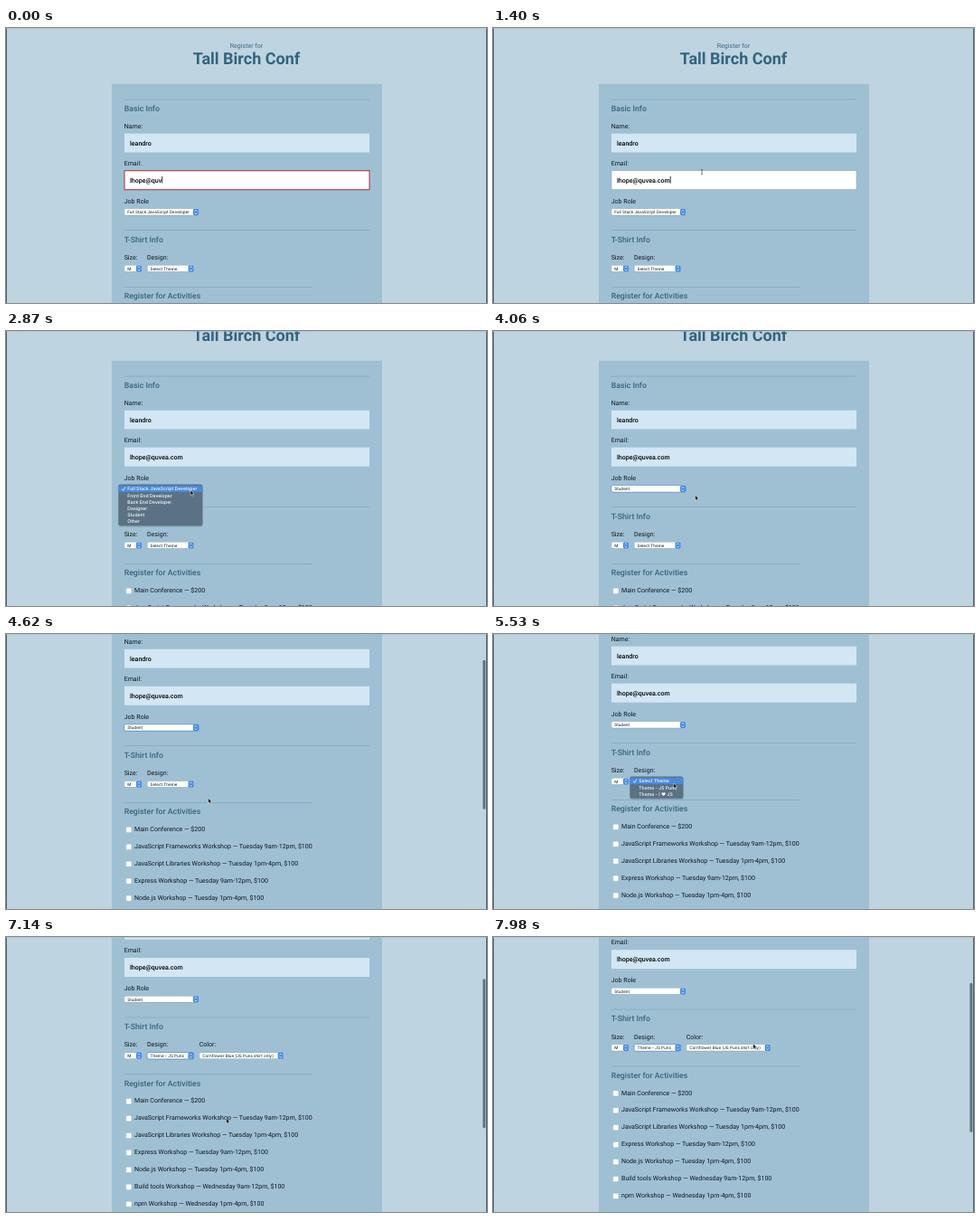
An HTML page for the animation above (8000 ms loop, 532 by 304 pixels).

```html
<!DOCTYPE html>
<html lang="en">
<head>
<meta charset="utf-8">
<title>Conference registration</title>
<style>
  html, body { margin: 0; width: 100%; height: 100%; overflow: hidden; background: #bed4e1; }
  svg { display: block; width: 532px; height: 304px; }
  text { font-family: Roboto, Inter, sans-serif; font-size: 7.05px; fill: #0c1820; white-space: pre; text-rendering: geometricPrecision; }
  .title { font-size: 18px; font-weight: 700; fill: #33647e; }
  .sub { fill: #3d6a81; }
  .legend { font-size: 8.75px; font-weight: 500; fill: #35647c; }
  .value { font-weight: 500; fill: #000; }
  .pick { font-family: Inter, sans-serif; font-size: 4.6px; fill: #111; }
  .option { font-family: Inter, "DejaVu Sans", sans-serif; font-size: 5.1px; font-weight: 500; fill: #fff; }
  .rule { fill: #82a9be; }
  .field { fill: #d2e6f3; }
</style>
</head>
<body>
<svg id="stage" viewBox="0 0 532 304"></svg>
<script>
const LOOP = 8000, STEP = 70, ROW = 7.15;
const JOB_Y = 203.5, SHIRT_Y = 266;
const EMAIL = "lhope@quvea.com";
const jobs = ["Full Stack JavaScript Developer", "Front End Developer", "Back End Developer", "Designer", "Student", "Other"];
const themes = ["Select Theme", "Theme - JS Puns", "Theme - I \u2665 JS"];
const activities = [
  "Main Conference \u2014 $200",
  "JavaScript Frameworks Workshop \u2014 Tuesday 9am-12pm, $100",
  "JavaScript Libraries Workshop \u2014 Tuesday 1pm-4pm, $100",
  "Express Workshop \u2014 Tuesday 9am-12pm, $100",
  "Node.js Workshop \u2014 Tuesday 1pm-4pm, $100",
  "Build tools Workshop \u2014 Wednesday 9am-12pm, $100",
  "npm Workshop \u2014 Wednesday 1pm-4pm, $100"
];

// time of each typed character after the first nine
const keyTimes = [140, 350, 490, 630, 770, 910];
// scrolls: start, end, from, to
const scrolls = [[1400, 2100, 0, 29], [4060, 4800, 29, 103], [6830, 7460, 103, 143.5]];
// pointer: time, x, y
const pointerPath = [
  [1400, 231, 159], [2300, 231, 159], [2800, 204, 176], [3100, 204, 176],
  [3500, 214, 203], [3640, 214, 203], [3850, 223.7, 181.5], [4900, 223.7, 181.5],
  [5320, 199.7, 165], [5600, 199.7, 165], [5800, 199, 171.5], [6050, 199, 171.5],
  [6500, 243.7, 200.5], [7480, 243.7, 200.5], [7850, 287.7, 118]
];

function add(parent, tag, attrs = {}, text) {
  const el = document.createElementNS("http://www.w3.org/2000/svg", tag);
  for (const k in attrs) el.setAttribute(k, attrs[k]);
  if (text) el.textContent = text;
  parent.appendChild(el);
  return el;
}
const rect = (p, x, y, width, height, attrs) => add(p, "rect", { x, y, width, height, ...attrs });
const label = (p, x, y, text, cls = "", dy = 2.5) => add(p, "text", { x, y: y + dy, class: cls }, text);
const show = (el, on) => el.setAttribute("visibility", on ? "visible" : "hidden");

function section(y, text, right = 402) {
  rect(page, 131, y, right - 131, 0.8, { class: "rule" });
  label(page, 130.7, y + 10.2, text, "legend", 3.1);
}

function select(p, x, y, w, value) {
  const g = add(p, "g");
  const ring = rect(g, x - 0.7, y - 4.1, w + 1.4, 8.2, { rx: 2, fill: "#5a97d8" });
  rect(g, x, y - 3.5, w, 7.2, { rx: 1.5, fill: "#7f9dae" });
  rect(g, x + 0.2, y - 3.4, w - 0.4, 6.7, { rx: 1.4, fill: "#fff" });
  const bx = x + w - 6;
  rect(g, bx, y - 3.5, 6, 7, { rx: 1.4, fill: "#4288e4" });
  add(g, "path", {
    d: `M${bx + 1.6} ${y - 0.7}l1.4-1.6 1.4 1.6M${bx + 1.6} ${y + 0.7}l1.4 1.6 1.4-1.6`,
    fill: "none", stroke: "#fff", "stroke-width": 0.7
  });
  const text = label(g, x + 3.2, y, value, "pick", 1.8);
  return { ring, text };
}

function popup(x, y, w, options) {
  const g = add(page, "g");
  const h = options.length * ROW + 2.8;
  rect(g, x + 0.5, y - 3.8, w, h, { rx: 2.5, fill: "#2b4454", opacity: 0.25 });
  rect(g, x, y - 4.9, w, h, { rx: 2, fill: "#5a7284" });
  const bar = rect(g, x, y - 3.6, w, ROW, { fill: "#4a8adb" });
  add(g, "path", { d: `M${x + 4} ${y}l1.3 1.8 2.4-3.8`, fill: "none", stroke: "#fff", "stroke-width": 0.8 });
  options.forEach((o, i) => label(g, x + 10, y + i * ROW, o, "option", 1.9));
  return {
    g,
    hover(pageY) {
      const i = Math.max(0, Math.min(options.length - 1, Math.round((pageY - y) / ROW)));
      bar.setAttribute("y", y - 3.6 + i * ROW);
    }
  };
}

const stage = document.getElementById("stage");
rect(stage, 0, 0, 532, 304, { fill: "#bed4e1" });
const page = add(stage, "g");

add(page, "text", { x: 266, y: 22, class: "sub", "text-anchor": "middle" }, "Register for");
add(page, "text", { x: 266, y: 39.7, class: "title", "text-anchor": "middle" }, "Tall Birch Conf");
rect(page, 117, 61.8, 299, 600, { fill: "#9fc0d3" });

section(78.7, "Basic Info");
label(page, 130.7, 108, "Name:");
rect(page, 131, 116.7, 271, 20.8, { class: "field" });
label(page, 137, 127, "leandro", "value");
label(page, 130.7, 149.3, "Email:");
const emailBox = rect(page, 131, 157.7, 271, 21, { class: "field" });
const emailText = label(page, 137, 168, EMAIL, "value");
const caret = rect(page, 0, 164, 0.8, 7.6, { fill: "#000" });
label(page, 130.7, 191.3, "Job Role");
const job = select(page, 131, JOB_Y, 82, jobs[0]);

section(223.2, "T-Shirt Info");
label(page, 130.7, 253.5, "Size:");
select(page, 131, SHIRT_Y, 19, "M").ring.remove();
label(page, 156, 253.5, "Design:");
const design = select(page, 156.3, SHIRT_Y, 51.2, themes[0]);
const color = add(page, "g");
label(color, 213.7, 253.5, "Color:");
select(color, 214, SHIRT_Y, 92.7, "Cornflower Blue (JS Puns shirt only)").ring.remove();

section(286, "Register for Activities", 339);
activities.forEach((name, i) => {
  const y = 315.5 + i * 18.94;
  rect(page, 132.7, y - 2.3, 6.2, 6.2, { rx: 1.2, fill: "#fff", stroke: "#8eabbb", "stroke-width": 0.4 });
  label(page, 142, y, name);
});

const jobList = popup(124.3, JOB_Y, 93, jobs);
const themeList = popup(151.3, SHIRT_Y - 0.5, 59, themes);

const thumb = rect(stage, 527.4, 0, 3, 165, { rx: 1.5, fill: "#566a77" });
rect(stage, 0, 0, 1, 304, { fill: "#4d6270" });
rect(stage, 531, 0, 1, 304, { fill: "#4d6270" });
rect(stage, 0, 0, 532, 0.6, { fill: "#a5bcca" });

const pointer = add(stage, "g");
const arrow = add(pointer, "path", {
  d: "M0 0V5.6L1.3 4.4 2.2 6.3 3.2 5.9 2.3 4H4Z",
  fill: "#000", stroke: "#fff", "stroke-width": 0.5
});
const beam = add(pointer, "path", {
  d: "M-1-2.6Q0-2.6 0-1.8V2Q0 2.8-1 2.8M1-2.6Q0-2.6 0-1.8M0 2Q0 2.8 1 2.8",
  fill: "none", stroke: "#3c4b55", "stroke-width": 0.7
});

function scrollAt(t) {
  let y = 0;
  for (const [start, end, from, to] of scrolls) {
    if (t < start) break;
    const p = Math.min(1, (t - start) / (end - start));
    y = to - (to - from) * Math.pow(1 - p, 2.25);
  }
  return y;
}

function pointerAt(t) {
  const next = pointerPath.findIndex(k => k[0] > t);
  if (next === 0) return pointerPath[0].slice(1);
  if (next < 0) return pointerPath[pointerPath.length - 1].slice(1);
  const [t0, x0, y0] = pointerPath[next - 1], [t1, x1, y1] = pointerPath[next];
  const p = (t - t0) / (t1 - t0), e = p * p * (3 - 2 * p);
  return [x0 + (x1 - x0) * e, y0 + (y1 - y0) * e];
}

// the scrollbar shows once a scroll has begun and fades after it rests
function thumbAlpha(t) {
  const fade = end => Math.max(0, Math.min(1, (end - t) / 250));
  if (t <= scrolls[0][0]) return 0;
  if (t <= scrolls[1][0]) return fade(2750);
  return t <= scrolls[2][0] ? fade(5400) : 1;
}

function render(t) {
  const y = scrollAt(t);
  page.setAttribute("transform", `translate(0 ${-y})`);
  thumb.setAttribute("y", -21.7 + 0.505 * y);
  thumb.setAttribute("opacity", thumbAlpha(t) * 0.9);

  const focused = t < 2870, invalid = t < 1050;
  emailText.textContent = EMAIL.slice(0, 9 + keyTimes.filter(k => t >= k).length);
  emailBox.style.fill = focused ? "#fff" : "";
  emailBox.style.stroke = invalid ? "#b9505c" : focused ? "#93a9b6" : "none";
  emailBox.style.strokeWidth = invalid ? 1.3 : 0.7;
  caret.setAttribute("x", 137.2 + emailText.getComputedTextLength());
  show(caret, focused && (invalid || Math.floor(t / 500) % 2 === 0));

  const [px, py] = pointerAt(t);
  pointer.setAttribute("transform", `translate(${px} ${py})`);
  show(arrow, t >= 2400);
  show(beam, t >= 1400 && t < 2400);

  show(jobList.g, t >= 2870 && t < 3640);
  jobList.hover(py + y);
  show(themeList.g, t >= 5390 && t < 6020);
  themeList.hover(py + y);

  job.text.textContent = jobs[t < 3640 ? 0 : 4];
  design.text.textContent = themes[t < 6020 ? 0 : 1];
  show(job.ring, t >= 2870 && t < 5390);
  show(design.ring, t >= 5390);
  show(color, t >= 6090);
}

const origin = performance.now();
function tick() {
  const t = (performance.now() - origin) % LOOP;
  render(Math.floor(t / STEP) * STEP);
  requestAnimationFrame(tick);
}
tick();
</script>
</body>
</html>
```
